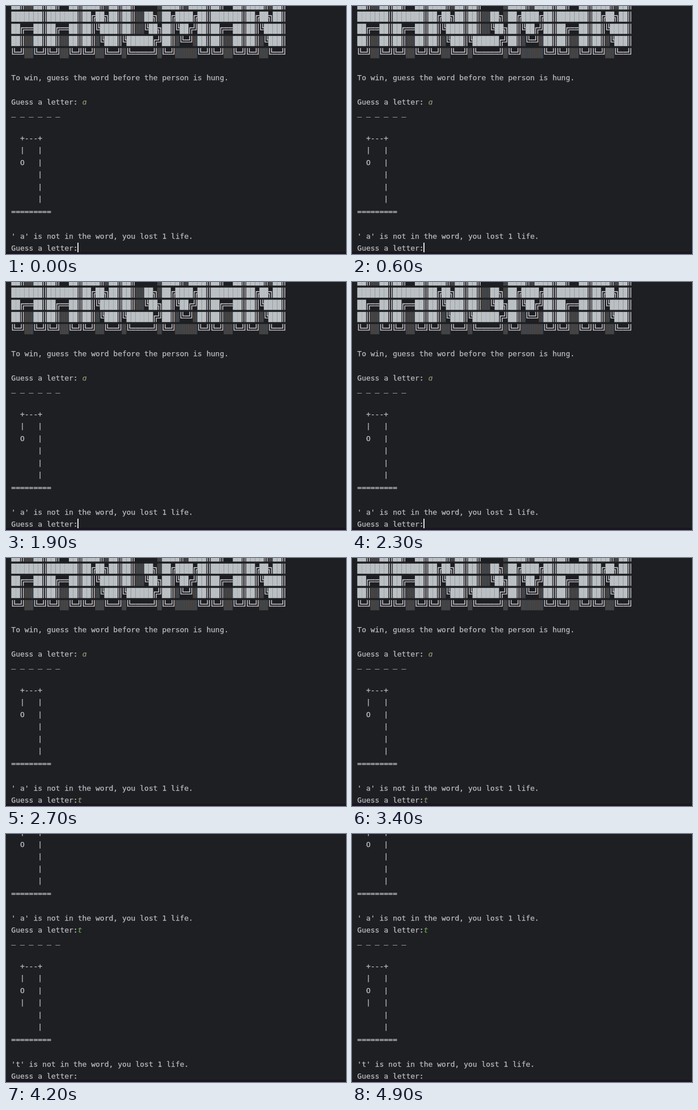
Write an HTML page with a canvas that moves like this. It is 600 by 438 pixels and loops after 5 s.

```html
<!DOCTYPE html>
<html lang="en">
<head>
<meta charset="utf-8">
<title>Hangman console</title>
<style>
html, body { margin: 0; height: 100%; overflow: hidden; background: #1e1f22; }
canvas { display: block; }
</style>
</head>
<body>
<canvas width="600" height="438"></canvas>
<script>
const ctx = document.querySelector('canvas').getContext('2d');
const LEFT = 9.3, CELL = 7.82, LINE = 21.5, BASE = 131;
const FONT = '13px "DejaVu Sans Mono", monospace';
const INK = '#bcbec4';

const BANNER = [
  '██║░░██║██╔══██╗████╗░██║██╔════╝░████╗░████║██╔══██╗████╗░██║',
  '███████║███████║██╔██╗██║██║░░██╗░██╔████╔██║███████║██╔██╗██║',
  '██╔══██║██╔══██║██║╚████║██║░░╚██╗██║╚██╔╝██║██╔══██║██║╚████║',
  '██║░░██║██║░░██║██║░╚███║╚██████╔╝██║░╚═╝░██║██║░░██║██║░╚███║',
  '╚═╝░░╚═╝╚═╝░░╚═╝╚═╝░░╚══╝░╚═════╝░╚═╝░░░░░╚═╝╚═╝░░╚═╝╚═╝░░╚══╝'
];
// horizontal and vertical direction of each corner's arms
const CORNERS = { '╗': [-1, 1], '╔': [1, 1], '╝': [-1, -1], '╚': [1, -1] };

const gallows = body => [
  '  +---+', '  |   |', '  O   |', `  ${body}   |`, '      |', '      |', '========='
];
const FIRST = [
  'To win, guess the word before the person is hung.', '',
  'Guess a letter:', '_ _ _ _ _ _', '', ...gallows(' '), '',
  "' a' is not in the word, you lost 1 life.", 'Guess a letter:'
];
const SECOND = [
  ...gallows(' ').slice(1), '', FIRST[13],
  'Guess a letter:', '_ _ _ _ _ _', '', ...gallows('|'), '',
  "'t' is not in the word, you lost 1 life.", 'Guess a letter:'
];

function rect(color, x, y, w, h) {
  ctx.fillStyle = color;
  ctx.fillRect(x, y, w, h);
}

// a thin outline gives the letters a slightly heavier weight
function print(text, col, row, color, font = FONT, lift = 0) {
  const x = LEFT + col * CELL, y = BASE + row * LINE - lift;
  ctx.font = font;
  ctx.fillStyle = ctx.strokeStyle = color;
  ctx.lineWidth = 0.25;
  ctx.fillText(text, x, y);
  ctx.strokeText(text, x, y);
}

function write(lines, firstRow) {
  lines.forEach((text, i) => {
    const lift = text[0] === '_' ? 2 : /[|+=]/.test(text) ? 1 : 0;
    print(text, 0, firstRow + i, INK, FONT, lift);
  });
}

function typed(letter, col, row, color) {
  print(letter, col, row, color, 'italic ' + FONT);
}

function bannerCell(ch, x, y) {
  const w = CELL, h = 18, gap = 1.8;
  if (ch === '█') return rect('#bac0c3', x, y, w, h);
  if (ch === '░') {
    rect('#343538', x, y, w, h);
    for (let i = 0; i < 4; i++) rect(i % 2 ? '#3c5468' : '#6a523d', x + i * 2, y, 1, h);
    return;
  }
  const cx = x + w / 2, cy = y + h / 2;
  ctx.beginPath();
  for (const s of [-gap, gap]) {
    if (ch === '║') {
      ctx.moveTo(cx + s, y);
      ctx.lineTo(cx + s, y + h);
    } else if (ch === '═') {
      ctx.moveTo(x, cy + s);
      ctx.lineTo(x + w, cy + s);
    } else {
      const [dx, dy] = CORNERS[ch];
      ctx.moveTo(cx + dx * w / 2, cy + s * dy);
      ctx.lineTo(cx + s * dx, cy + s * dy);
      ctx.lineTo(cx + s * dx, cy + dy * h / 2);
    }
  }
  ctx.stroke();
}

function banner() {
  ctx.strokeStyle = '#d2d0d8';
  ctx.lineWidth = 1.4;
  BANNER.forEach((line, r) => [...line].forEach((ch, c) =>
    bannerCell(ch, LEFT + c * CELL, -11.7 + r * LINE)));
}

function draw(now) {
  const t = now % 5000;
  rect('#1e1f22', 0, 0, 600, 438);
  rect('#1b1521', 0, 434, 600, 4);
  if (t < 3500) {
    banner();
    write(FIRST, 0);
    typed('ɑ', 16, 2, '#8a9670');
    if (t >= 2400) typed('t', 15, 14, '#8a9670');
    else if (t < 1400 || t >= 1900) rect('#dddee2', 126, 418, 2, 17);
  } else {
    write(SECOND, -6);
    typed('t', 15, 2, '#6fa35c');
  }
  requestAnimationFrame(draw);
}
requestAnimationFrame(draw);
</script>
</body>
</html>
```
